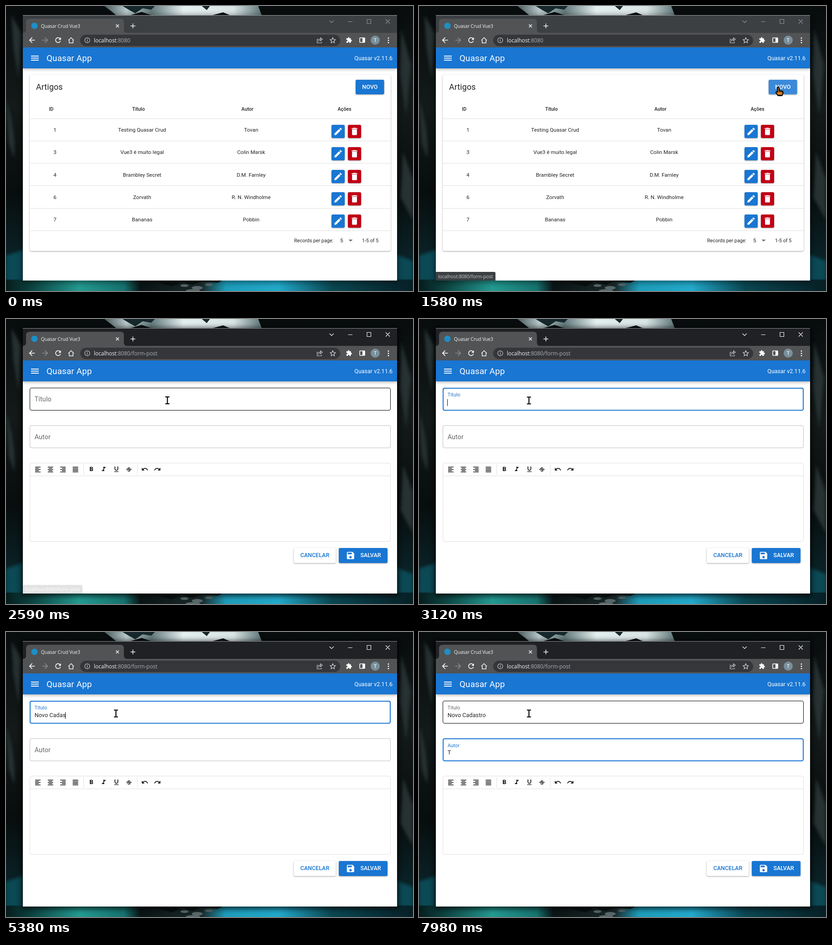
An HTML page for the animation above (8 s loop, 894x626 px).

```html
<!DOCTYPE html>
<html lang="pt">
<head>
<meta charset="utf-8">
<title>Quasar Crud Vue3</title>
<style>
html, body { margin: 0; width: 100%; height: 100%; overflow: hidden; background: #070c0c; }
svg { display: block; width: 894px; height: 626px; --frame: #202124; --control: #fff; --status: #e8eaed; }
svg.idle { --frame: #3c4043; --control: #92959a; --status: #c4c7ca; }
text { font-family: Roboto, sans-serif; font-size: 11.63px; fill: rgba(0,0,0,.87); white-space: pre; }
.ui { font-family: "Open Sans", sans-serif; font-size: 10.5px; letter-spacing: -.2px; fill: #f1f3f4; }
.url { font-size: 12px; letter-spacing: -.06px; }
.url tspan { fill: #a9adb1; }
.status { letter-spacing: -.14px; fill: var(--status); }
.mid { text-anchor: middle; }
.end { text-anchor: end; }
.head { font-size: 10.74px; font-weight: 500; }
.small { font-size: 10.74px; }
.btn { font-size: 12.53px; font-weight: 500; text-anchor: middle; }
.label { font-size: 14.32px; letter-spacing: .13px; }
.input { font-size: 12.53px; letter-spacing: .1px; }
.white { fill: #fff; }
.blue { fill: #1976d2; }
.raised { filter: drop-shadow(0 1px 1.5px rgba(0,0,0,.38)); }
.bar { filter: drop-shadow(0 2px 3px rgba(0,0,0,.3)); }
.line { fill: none; stroke: #f1f3f4; stroke-width: 1.5; }
.control { fill: none; stroke: var(--control); stroke-width: 1.1; }
.frame { fill: var(--frame); }
.soft { filter: blur(3px); }
</style>
</head>
<body>
<svg id="stage" viewBox="0 0 894 626" class="idle">
  <defs>
    <linearGradient id="cave" x2="0" y2="1">
      <stop offset="0" stop-color="#080c0d"/><stop offset=".35" stop-color="#131a19"/>
      <stop offset=".65" stop-color="#080d0d"/><stop offset=".86" stop-color="#0a2024"/><stop offset="1" stop-color="#09292c"/>
    </linearGradient>
    <linearGradient id="water">
      <stop offset="0" stop-color="#061c1c"/><stop offset=".07" stop-color="#0d4845"/>
      <stop offset=".18" stop-color="#239a91"/><stop offset=".29" stop-color="#16726e"/>
      <stop offset=".33" stop-color="#0a1415"/><stop offset=".48" stop-color="#1b2829"/>
      <stop offset=".54" stop-color="#1d9cb9"/><stop offset=".67" stop-color="#22a9cb"/>
      <stop offset=".8" stop-color="#0a4752"/><stop offset="1" stop-color="#071f25"/>
    </linearGradient>
    <linearGradient id="falls">
      <stop offset="0" stop-color="#46575a"/><stop offset=".14" stop-color="#b9c9cb"/>
      <stop offset=".3" stop-color="#62797b"/><stop offset=".5" stop-color="#e3eeee"/>
      <stop offset=".82" stop-color="#d8e4e3"/><stop offset="1" stop-color="#5d7477"/>
    </linearGradient>
  </defs>
  <g id="scenery">
    <path fill="url(#cave)" d="M0 0H894V626H0z"/>
    <path class="soft" fill="#273132" d="M0 205Q22 270 18 335L6 300zM12 20L34 60 28 160 16 90zM868 50L890 130 879 240 865 150zM872 320L894 380V470L866 420z"/>
    <path class="soft" fill="#0b4955" d="M0 548L40 535V605H0zM855 545L894 560V604H855z"/>
    <path fill="url(#falls)" d="M216 0H554L562 21H494L477 14 450 21H322L298 13 270 21H243L232 12z"/>
    <path fill="#16282b" d="M256 0H327L319 8 300 5 284 16 271 9zM430 0H448L441 9z"/>
    <path fill="url(#water)" d="M0 601H894V626H0z"/>
    <path fill="#090f10" d="M270 600H480L465 608 430 605 410 612 386 606 365 616 335 608 300 607z"/>
    <g fill="#59696b"><ellipse cx="392" cy="614" rx="9" ry="3"/><ellipse cx="420" cy="619" rx="12" ry="4"/><ellipse cx="446" cy="612" rx="9" ry="3"/><ellipse cx="411" cy="625" rx="16" ry="3"/></g>
  </g>
  <rect id="windowShadow" x="34" y="20" width="828" height="588" style="filter:blur(6px)"/>
  <path fill="#fff" d="M37 20H859V603H37z"/>
  <g id="list"></g>
  <g id="form"></g>
  <g id="chrome"></g>
  <g id="status">
    <path class="frame" d="M37 603V584H165q3 0 3 3V603z"/>
    <text class="ui status" x="42" y="597.5">localhost:8080/form-post</text>
  </g>
  <g id="arrow"><path d="M0 0V17L4 13.5 7 20 10 18.5 7.2 12.5H12z" fill="#d9821f" stroke="#000" stroke-width="1.6"/></g>
  <g id="hand" stroke="#000" stroke-linejoin="round">
    <path d="M-1.5 1Q0-1 2 1V8L9 9Q11 10 10.500 14L8.500 19H-.5L-5 12Q-4 9-1.500 11z" fill="#d9821f" stroke-width="2"/>
    <path d="M2 8V12M5 9V12M8 10V13" stroke-width="1"/><path d="M-.5 18.500H8.500" stroke-width="3"/>
  </g>
  <path id="beam" d="M-4.500-7.500H4.500M-4.500 7.500H4.500M0-7.500V7.500" fill="none" stroke="#000" stroke-width="2.2"/>
</svg>
<script>
const LOOP = 8000, BLINK = 530, BLUE = '#1976d2';
const $ = id => document.getElementById(id);

const text = (x, y, content, cls = '') => `<text x="${x}" y="${y}" class="${cls}">${content}</text>`;
const box = (x, y, w, h, fill, r = 0, more = '') =>
  `<rect x="${x}" y="${y}" width="${w}" height="${h}" rx="${r}" fill="${fill}" ${more}/>`;
const outline = (x, y, w, h, stroke, more = '') =>
  box(x, y, w, h, 'none', 3.5, `stroke="${stroke}" ${more}`);
const icon = (d, cx, cy, scale, fill = '#fff', flip = 1) =>
  `<path d="${d}" fill="${fill}" transform="translate(${cx} ${cy}) scale(${scale * flip} ${scale}) translate(-12 -12)"/>`;
const stroke = (d, cls = 'line') => `<path class="${cls}" d="${d}"/>`;

const ICON = {
  edit: 'M3 17.25V21h3.75L17.81 9.94l-3.75-3.75zM20.71 7.04c.39-.39.39-1.02 0-1.41l-2.34-2.34c-.39-.39-1.02-.39-1.41 0l-1.83 1.83 3.75 3.75z',
  trash: 'M6 19c0 1.1.9 2 2 2h8c1.1 0 2-.9 2-2V7H6zM19 4h-3.5l-1-1h-5l-1 1H5v2h14z',
  save: 'M17 3H5c-1.11 0-2 .9-2 2v14c0 1.1.89 2 2 2h14c1.1 0 2-.9 2-2V7zm-5 16c-1.66 0-3-1.34-3-3s1.34-3 3-3 3 1.34 3 3-1.34 3-3 3zm3-10H5V5h10z',
  bold: 'M15.6 10.79c.97-.67 1.65-1.77 1.65-2.79 0-2.26-1.75-4-4-4H7v14h7.04c2.09 0 3.71-1.7 3.71-3.79 0-1.52-.86-2.82-2.15-3.42zM10 6.5h3c.83 0 1.5.67 1.5 1.5s-.67 1.5-1.5 1.5h-3zm3.5 9H10v-3h3.5c.83 0 1.5.67 1.5 1.5s-.67 1.5-1.5 1.5z',
  italic: 'M10 4v3h2.21l-3.42 8H6v3h8v-3h-2.21l3.42-8H18V4z',
  underline: 'M12 17c3.31 0 6-2.69 6-6V3h-2.5v8c0 1.93-1.57 3.5-3.5 3.5S8.500 12.930 8.500 11V3H6v8c0 3.31 2.69 6 6 6zm-7 2v2h14v-2z',
  undo: 'M12.5 8c-2.65 0-5.05.99-6.9 2.6L2 7v9h9l-3.62-3.62c1.39-1.16 3.16-1.88 5.12-1.88 3.54 0 6.55 2.31 7.6 5.5l2.37-.78C21.08 11.03 17.15 8 12.5 8z',
  back: 'M20 11H7.83l5.59-5.59L12 4l-8 8 8 8 1.41-1.41L7.83 13H20z',
  reload: 'M17.65 6.35C16.2 4.9 14.21 4 12 4c-4.42 0-8 3.58-8 8s3.58 8 8 8c3.73 0 6.84-2.55 7.73-6h-2.08c-.82 2.33-3.04 4-5.65 4-3.31 0-6-2.69-6-6s2.69-6 6-6c1.66 0 3.14.69 4.22 1.78L13 11h7V4z',
  puzzle: 'M20.5 11H19V7c0-1.1-.9-2-2-2h-4V3.5a2.5 2.5 0 0 0-5 0V5H4c-1.1 0-2 .9-2 2v3.8h1.5a2.7 2.7 0 0 1 0 5.4H2V20c0 1.1.9 2 2 2h3.8v-1.5a2.7 2.7 0 0 1 5.4 0V22H17c1.1 0 2-.9 2-2v-4h1.5a2.5 2.5 0 0 0 0-5z'
};

const rows = [
  [1, 'Testing Quasar Crud', 'Tovan'],
  [3, 'Vue3 é muito legal', 'Colin Marsk'],
  [4, 'Brambley Secret', 'D.M. Farnley'],
  [6, 'Zorvath', 'R. N. Windholme'],
  [7, 'Bananas', 'Pobbin']
];

function listMarkup() {
  const tableRows = rows.map(([id, title, author], i) => {
    const top = Math.round(261 + 49.25 * i), base = top + 14.5;
    return text(107.5, base, id, 'mid') + text(299, base, title, 'mid') + text(538.5, base, author, 'mid') +
      box(715, top, 29, 29, BLUE, 3, 'class="raised"') + icon(ICON.edit, 729.5, top + 14.5, .895) +
      box(751, top, 29, 29, '#c10015', 3, 'class="raised"') + icon(ICON.trash, 765.5, top + 14.5, .895);
  }).join('');
  const rules = [247, 296, 345, 394, 444, 493].map(y => box(52, y, 793, 1, '#e0e0e0')).join('');
  return box(52, 151, 793, 387, '#fff', 4, 'class="raised"') + rules +
    `<text x="66" y="184" style="font-size:17.9px;letter-spacing:.1px">Artigos</text>` +
    box(768, 162, 62.5, 32, BLUE, 3, 'class="raised"') +
    box(768, 162, 62.5, 32, '#fff', 3, 'id="hover"') + text(799.3, 181.5, 'NOVO', 'btn white') +
    text(99.3, 230, 'ID', 'head mid') + text(291, 230, 'Título', 'head mid') +
    text(530.3, 230, 'Autor', 'head mid') + text(743.5, 230, 'Ações', 'head mid') + tableRows +
    text(633, 518.5, 'Records per page:', 'small') + text(734, 518.5, '5', '') +
    '<path d="M752.500 513h9l-4.500 4.500z" fill="#757575"/>' + text(782, 518.5, '1-5 of 5', 'small');
}

const fieldMarkup = (name, label, top) =>
  outline(52.5, top + .5, 792, 49, '#000', `id="${name}Edge"`) +
  outline(53, top + 1, 791, 48.5, BLUE, `id="${name}Ring" stroke-width="2"`) +
  `<text class="label" id="${name}Label">${label}</text>` +
  text(62.7, top + 35.7, '', 'input').replace('<text', `<text id="${name}Text"`) +
  box(62.5, top + 25, 1, 15, '#000', 0, `id="${name}Caret"`);

function alignIcon(cx, anchor) {
  return [0, 1, 2, 3, 4].map(i => {
    const width = i % 2 && anchor < 2 ? 8 : 12;
    return box(cx - 6 + (12 - width) * Math.min(anchor, 1), 324.6 + i * 2.67, width, 1.35, '#111');
  }).join('');
}

function formMarkup() {
  const tool = (name, x, flip) => icon(ICON[name], x, 330, .667, '#111', flip);
  return fieldMarkup('title', 'Título', 151) + fieldMarkup('author', 'Autor', 233.5) +
    outline(52.5, 316.5, 792, 172, '#e0e0e0') + box(53, 344, 791, 1, '#e0e0e0') +
    alignIcon(70, 0) + alignIcon(97.7, .5) + alignIcon(125, 1) + alignIcon(152.5, 2) +
    box(170, 319, 1, 23, '#e0e0e0') + box(288, 319, 1, 23, '#e0e0e0') +
    tool('bold', 187.5) + tool('italic', 214.7) + tool('underline', 242.5) +
    `<text x="270" y="334.500" class="mid" style="font-size:12px;font-weight:700">S</text>` + box(264, 329.6, 12, 1.3, '#111') +
    tool('undo', 305) + tool('undo', 332.5, -1) +
    box(632, 503, 92.5, 33, '#fff', 3, 'class="raised"') + text(678.4, 523.3, 'CANCELAR', 'btn blue') +
    box(731, 503, 107, 33, BLUE, 3, 'class="raised"') + icon(ICON.save, 756.8, 519.5, .895) +
    text(801, 523.3, 'SALVAR', 'btn white');
}

function chromeMarkup() {
  const dots = [70.5, 75.5, 80.5].map(y => `<circle cx="840" cy="${y}" r="1.400" fill="#fff"/>`).join('');
  const menu = [109, 113.5, 118].map(y => box(55, y, 17, 1.9, '#fff')).join('');
  return '<g class="bar">' + box(37, 91, 822, 46, BLUE) + '</g>' + menu +
    `<text x="89" y="121" class="white" style="font-size:18.800px;letter-spacing:.19px">Quasar App</text>` +
    `<text x="849" y="119" class="white end" style="font-size:12.530px">Quasar v2.11.6</text>` +
    '<path class="frame" d="M37 20.500H859V60H37z"/>' +
    '<path fill="#525354" d="M37 59Q44 59 44 52V36Q44 28 52 28H251Q259 28 259 36V52Q259 59 266 59H859V91H37z"/>' +
    '<circle cx="62.500" cy="43.500" r="7" fill="#1d8fc4"/>' + text(76.7, 47.5, 'Quasar Crud Vue3', 'ui') +
    stroke('M241.500 40.500l6.500 6.500m0-6.500l-6.500 6.500M278.700 38.500V49M273.500 43.700H284') +
    stroke('M710.500 32l4.700 4.500 4.700-4.500M751.500 34.500H761M793 29.500H801.500V38.500H793zM834 29.500l9 9m0-9l-9 9', 'control') +
    icon(ICON.back, 57, 75, .8) + icon(ICON.back, 86, 75, .8, '#8b8c8e', -1) + icon(ICON.reload, 114.5, 75, .77) +
    stroke('M137 75.500L143 69.500 149 75.500M138.800 74.500V81H147.200V74.500') +
    box(163, 63, 571, 25, '#35363a', 12.5) +
    '<circle class="line" cx="178.500" cy="75.300" r="5.500" style="stroke:#c8cacd;stroke-width:1.200"/>' +
    box(177.9, 74.5, 1.3, 3.8, '#c8cacd') + box(177.9, 72, 1.3, 1.4, '#c8cacd') +
    `<text x="193" y="79.500" class="ui url">localhost<tspan id="path"></tspan></text>` +
    '<g style="stroke-width:1.200">' +
    '<path d="M687 73H683.500V81H693V78.500M686 78Q687 73 692 73M690.500 69.500L695 73 690.500 76.500V69.500" fill="none" stroke="#c8cacd"/>' +
    '<path d="M717.800 69.500l1.700 4 4.200.4-3.200 2.800 1 4.200-3.700-2.300-3.700 2.300 1-4.200-3.200-2.800 4.200-.4z" fill="none" stroke="#dadce0"/></g>' +
    icon(ICON.puzzle, 753.5, 75, .59) +
    box(777, 70, 11, 10, 'none', 1, 'stroke="#fff" stroke-width="1.600"') + box(783, 70, 5, 10, '#fff') +
    '<circle cx="811" cy="75" r="10" fill="#78909c"/>' + text(811, 79, 'T', 'mid white') + dots;
}

$('list').innerHTML = listMarkup();
$('form').innerHTML = formMarkup();
$('chrome').innerHTML = chromeMarkup();

const clamp = v => Math.max(0, Math.min(1, v));
const progress = (t, start, span) => clamp((t - start) / span);
const settle = p => 1 - (1 - p) ** 2.4;
const smooth = p => p * p * (3 - 2 * p);
const mix = (a, b, p) => a + (b - a) * p;
const show = (id, visible) => { $(id).style.opacity = +visible; };
const place = (id, x, y) => $(id).setAttribute('transform', `translate(${x} ${y})`);

const ACTIVATE = 1910, NAVIGATE = 1980, EASE = 360;
const fields = [
  { name: 'title', top: 151, focus: 2855, blur: 6180, hover: 2050, content: 'Novo Cadastro',
    keys: [4045, 4245, 4385, 4450, 4575, 4845, 5045, 5180, 5245, 5375, 5705, 5845, 5915] },
  { name: 'author', top: 233.5, focus: 6185, blur: LOOP, hover: LOOP, content: 'T', keys: [7445] }
];

function drawField({ name, top, focus, blur, hover, content, keys }, t) {
  const float = settle(progress(t, focus, EASE));
  const lit = float * (1 - settle(progress(t, blur, EASE)));
  const typed = keys.filter(k => k <= t).length;
  const lastKey = typed ? keys[typed - 1] : focus;
  const blinkOn = Math.floor((t - lastKey) / BLINK) % 2 === 0;

  $(name + 'Edge').style.strokeOpacity = mix(.26, 1, settle(progress(t, hover, EASE)));
  show(name + 'Ring', clamp(lit * 1.1));
  const label = $(name + 'Label');
  label.setAttribute('transform', `translate(62.7 ${top + mix(30, 19, float)}) scale(${mix(1, .75, float)})`);
  label.style.fill = `rgba(${25 * lit},${118 * lit},${210 * lit},${mix(.6, 1, lit)})`;

  const value = $(name + 'Text');
  value.textContent = content.slice(0, typed);
  $(name + 'Caret').setAttribute('x', Math.floor(62.5 + (typed ? value.getComputedTextLength() : 0)) + .1);
  show(name + 'Caret', t >= focus && t < blur && blinkOn);
}

function drawCursor(t) {
  const enter = smooth(progress(t, 480, 800));
  const x = mix(826, 789, enter), y = mix(340, 178, enter);
  const overButton = y < 194;
  show('arrow', t >= 520 && !overButton);
  show('hand', overButton && t < NAVIGATE);
  show('beam', t >= NAVIGATE);
  place('arrow', x, y);
  place('hand', x, y);
  const travel = smooth(progress(t, 2110, 680));
  place('beam', mix(788, 241.5, travel), mix(177, 179, travel));
}

function draw(t) {
  const onForm = t >= NAVIGATE;
  $('stage').classList.toggle('idle', t < ACTIVATE);
  $('list').style.display = onForm ? 'none' : '';
  $('form').style.display = onForm ? '' : 'none';
  $('path').textContent = onForm ? ':8080/form-post' : ':8080';
  show('windowShadow', t < ACTIVATE ? .4 : .75);
  show('hover', .15 * settle(progress(t, 1120, 300)));
  show('status', progress(t, 1220, 160) * (1 - progress(t, 2380, 240)));
  fields.forEach(field => drawField(field, t));
  drawCursor(t);
}

const start = performance.now();
function tick() {
  draw((performance.now() - start) % LOOP);
  requestAnimationFrame(tick);
}
tick();
</script>
</body>
</html>
```
